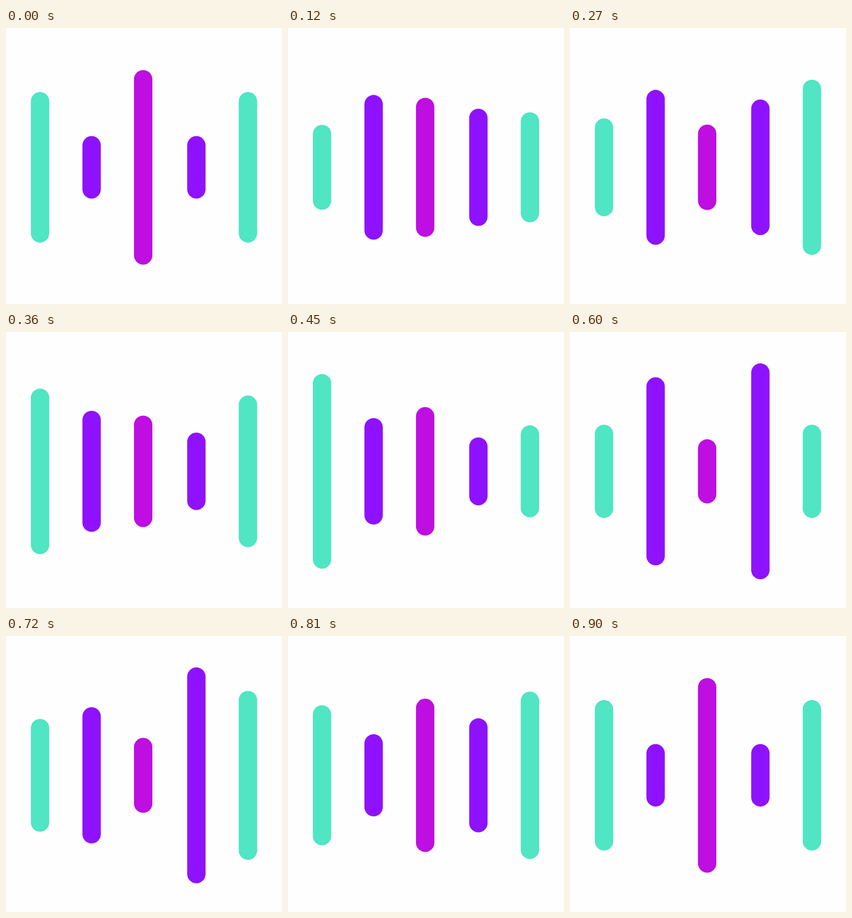
An HTML page that plays this animation: 500 px wide and 500 px high, repeating every 0.93 s.

```html
<!DOCTYPE html>
<html lang="en">
<head>
<meta charset="utf-8">
<title>Sound bars</title>
<style>
  html, body { margin: 0; height: 100%; overflow: hidden; background: #fefefe; }
  svg { display: block; width: 100%; height: 100%; }
  line { stroke-width: 33.3px; stroke-linecap: round; }
</style>
</head>
<body>
<svg viewBox="0 0 500 500"></svg>
<script>
const TICK = 30, LAST_TICK = 30;
const CENTER = 252.4, HALF_UNIT = 39.9, GAP = 93.4;

// Colours and resting levels mirror around the middle bar
const colors = ['#50e5c3', '#8f12fe', '#be0ee1'];
const rests = [3, 1, 4];

// Turning points per bar between two rests: [tick, level]
const turns = [
  [[5.9, 1.1], [15, 4], [19.9, 1.7]],
  [[6, 3.43], [15, 2], [19, 3.9]],
  [[8, 1.48], [15, 2.5], [21, 0.95], [22.2, 0.95]],
  [[7, 3], [14, 1], [22, 5]],
  [[5, 2], [10, 3.7], [15, 1.67], [20, 1.7], [25, 3.57]]
];

// cubic-bezier(.42, 0, .58, 1)
function easeInOut(u) {
  let low = 0, high = 1, s = 0.5;
  for (let i = 0; i < 20; i++) {
    s = (low + high) / 2;
    if (s * (1.26 + s * (-0.78 + s * 0.52)) < u) low = s;
    else high = s;
  }
  return s * s * (3 - 2 * s);
}

function levelAt(keys, tick) {
  const next = Math.max(1, keys.findIndex(([time]) => time >= tick));
  const [t0, a] = keys[next - 1], [t1, b] = keys[next];
  return a + (b - a) * easeInOut((tick - t0) / (t1 - t0));
}

const svg = document.querySelector('svg');
const bars = turns.map((points, i) => {
  const ring = Math.min(i, 4 - i);
  const x = i < 3 ? 61.7 + i * GAP : 438.3 - ring * GAP;
  const line = document.createElementNS(svg.namespaceURI, 'line');
  line.setAttribute('x1', x);
  line.setAttribute('x2', x);
  line.setAttribute('stroke', colors[ring]);
  svg.append(line);
  return { line, keys: [[0, rests[ring]], ...points, [LAST_TICK, rests[ring]]] };
});

const start = performance.now();
function draw() {
  const tick = Math.floor((performance.now() - start) / TICK) % (LAST_TICK + 1);
  for (const { line, keys } of bars) {
    const reach = levelAt(keys, tick) * HALF_UNIT;
    line.setAttribute('y1', CENTER - reach);
    line.setAttribute('y2', CENTER + reach);
  }
  requestAnimationFrame(draw);
}
draw();
</script>
</body>
</html>
```
